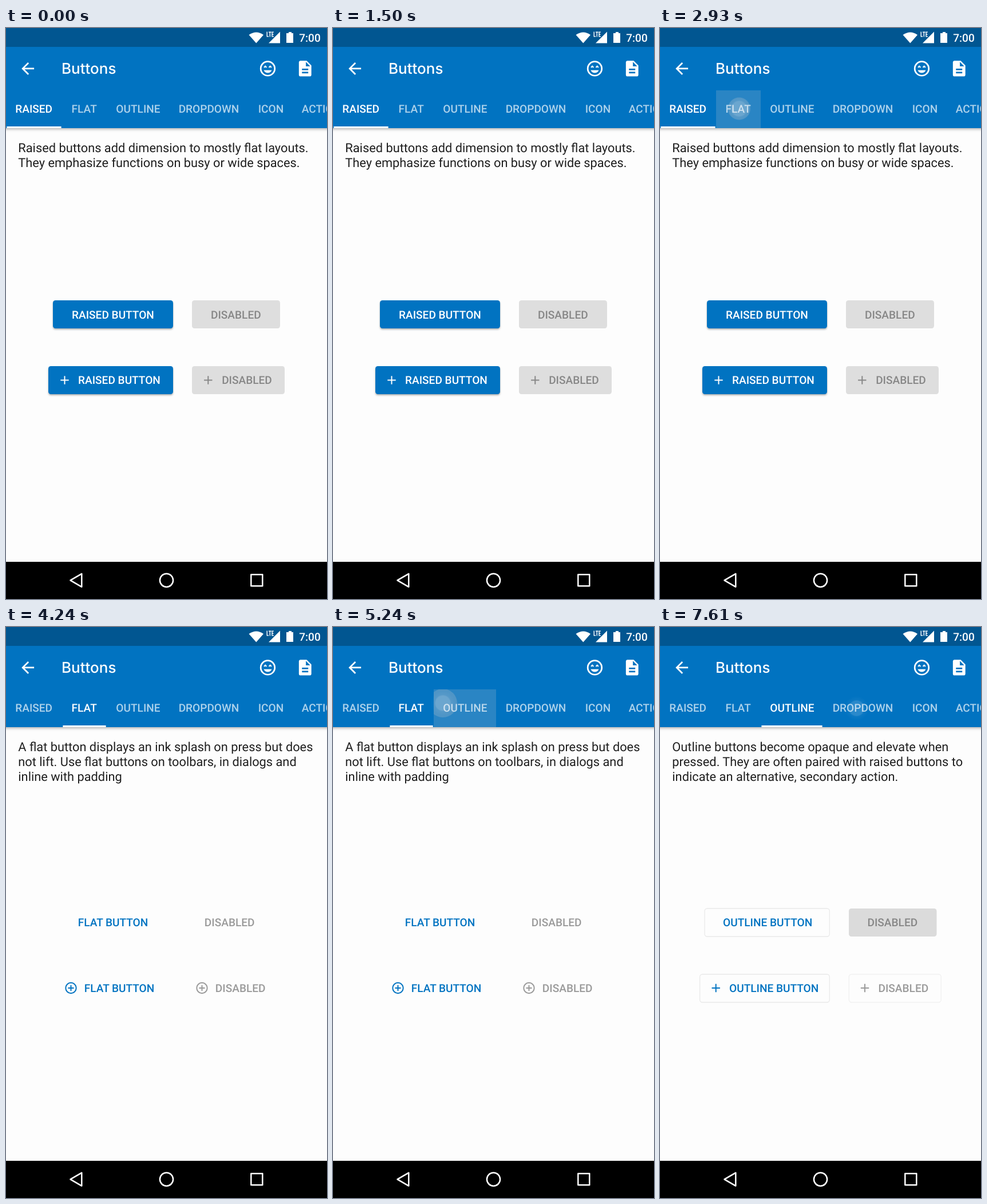
Write an HTML page that moves like this. It is 561 px wide and 998 px high and loops after 8 s.

```html
<!DOCTYPE html>
<html lang="en">
<head>
<meta charset="utf-8">
<title>Buttons demo</title>
<style>
  html, body { margin: 0; width: 100%; height: 100%; overflow: hidden; background: #fdfdfd; }
  svg { display: block; width: 100%; height: 100%; text-rendering: geometricPrecision; }
  text { font-family: Roboto, sans-serif; }
  .label { font-size: 19.09px; font-weight: 500; text-anchor: middle; }
  .body { font-size: 21.8px; fill: #1f1f1f; }
  .title { font: 500 26px Inter, sans-serif; }
  .bar { filter: drop-shadow(0 2px 2.5px rgba(0, 0, 0, .3)); }
  .raised { filter: drop-shadow(0 2px 1.5px rgba(0, 0, 0, .3)); }
</style>
</head>
<body>
<svg viewBox="0 0 561 998" preserveAspectRatio="none">
  <defs>
    <radialGradient id="glow">
      <stop offset=".58" stop-color="#fff" stop-opacity=".16"/>
      <stop offset=".68" stop-color="#fff" stop-opacity=".04"/>
      <stop offset="1" stop-color="#fff" stop-opacity="0"/>
    </radialGradient>
    <clipPath id="tabClip"><rect id="clipBox" y="109" height="66"/></clipPath>
  </defs>
  <rect width="561" height="998" fill="#fdfdfd"/>
  <g id="pages"></g>

  <rect class="bar" x="-10" y="-10" width="581" height="185" fill="#0173c1"/>
  <rect width="561" height="33" fill="#015691"/>
  <g fill="#fff">
    <path d="M424.5 12Q437.500 3 450 12L437.300 26.500Z"/>
    <path d="M459 26.500H479V6.500Z"/>
    <path d="M456.200 6.500V14.800H459M459 7.200H463.600M461.300 7V15.500M467.800 7.200H465V14.800H467.800M465 11H467.500" fill="none" stroke="#fff" stroke-width="1.4"/>
    <path d="M490 9H494V7H499V9H502V26H490Z"/>
    <text class="label" x="531" y="23.500">7:00</text>
    <path transform="translate(21.8 54.6) scale(1.364)" d="M20 11H7.830l5.590-5.590L12 4l-8 8 8 8 1.410-1.410L7.830 13H20z"/>
    <text class="title" x="97" y="80">Buttons</text>
    <g transform="translate(441.1 54.6) scale(1.364)">
      <circle cx="12" cy="12" r="9" fill="none" stroke="#fff" stroke-width="2"/>
      <path d="M7.300 10.500l1.580-1.600 1.580 1.600M13.540 10.500l1.580-1.600 1.580 1.600" fill="none" stroke="#fff" stroke-width="1.5"/>
      <path d="M12 17.500c2.330 0 4.310-1.460 5.110-3.500H6.890c.8 2.040 2.780 3.500 5.110 3.500z"/>
    </g>
    <path transform="translate(506.4 54.6) scale(1.364)" d="M14 2H6c-1.100 0-2 .9-2 2V20c0 1.100.9 2 2 2H18c1.100 0 2-.9 2-2V8zm2 16H8v-2h8zm0-4H8v-2h8zm-3-5V3.500L18.500 9z"/>
  </g>

  <g id="ink" clip-path="url(#tabClip)" fill="#ccc">
    <rect id="light" y="109" height="66"/>
    <circle id="splash" fill-opacity=".23"/>
  </g>
  <g id="tabs" fill="#fff"></g>
  <rect id="line" y="172" height="3" fill="#fff"/>
  <circle id="spot" r="21.5" fill="url(#glow)"/>

  <rect y="933" width="561" height="65" fill="#000"/>
  <g fill="none" stroke="#fff" stroke-width="2.5" stroke-linejoin="round">
    <path d="M112.500 965.300L132.300 953.800V976.800Z"/>
    <circle cx="280.500" cy="965.300" r="11.600"/>
    <rect x="428.300" y="955.300" width="20" height="20"/>
  </g>
</svg>
<script>
const LOOP = 8000, BLUE = '#0173c1', GREY = '#9a9a9a', DIM = '#878787';
const $ = id => document.getElementById(id);
const set = (el, attrs) => { for (const k in attrs) el.setAttribute(k, attrs[k]); };

const label = (s, x, y, fill) => `<text class="label" x="${x}" y="${y + 6.8}" fill="${fill}">${s}</text>`;
const box = (x1, x2, y, attrs) =>
  `<rect x="${x1}" y="${y}" width="${x2 - x1}" height="49" rx="4.5" ${attrs}/>`;
const plus = (x, y, color, r = 7.2) =>
  `<path d="M${x - r} ${y}h${2 * r}M${x} ${y - r}v${2 * r}" stroke="${color}" stroke-width="2"/>`;
const ringPlus = (x, y, color) => plus(x, y, color, 5.1) +
  `<circle cx="${x}" cy="${y}" r="9.2" fill="none" stroke="${color}" stroke-width="2"/>`;
const body = lines => lines.map((s, i) => `<text class="body" x="21.3" y="${217 + 26 * i}">${s}</text>`).join('');

const solid = `class="raised" fill="${BLUE}"`;
const off = 'fill="#dedede"';
const edge = a => `fill="none" stroke="#000" stroke-opacity="${a}" stroke-width="1.36"`;

const pages = [
  body(['Raised buttons add dimension to mostly flat layouts.',
        'They emphasize functions on busy or wide spaces.']) +
  box(82, 292, 476, solid) + label('RAISED BUTTON', 187, 500.7, '#fff') +
  box(325, 479, 476, off) + label('DISABLED', 401.8, 500.7, DIM) +
  box(74, 292, 591, solid) + plus(102.5, 615.5, '#fff') + label('RAISED BUTTON', 198, 615.5, '#fff') +
  box(325, 487, 591, off) + plus(353.3, 615.5, DIM) + label('DISABLED', 421, 615.5, DIM),

  body(['A flat button displays an ink splash on press but does',
        'not lift. Use flat buttons on toolbars, in dialogs and',
        'inline with padding']) +
  label('FLAT BUTTON', 187, 516.5, BLUE) + label('DISABLED', 390.7, 516.5, GREY) +
  ringPlus(113.5, 631, BLUE) + label('FLAT BUTTON', 198, 631, BLUE) +
  ringPlus(342.5, 631, GREY) + label('DISABLED', 409.7, 631, GREY),

  body(['Outline buttons become opaque and elevate when',
        'pressed. They are often paired with raised buttons to',
        'indicate an alternative, secondary action.']) +
  box(78, 296.3, 492, edge(.08)) + label('OUTLINE BUTTON', 188.2, 516.5, BLUE) +
  box(330, 483.5, 492, 'fill="#dbdbdb"') + label('DISABLED', 406.3, 516.5, DIM) +
  box(69.6, 296.3, 607, edge(.08)) + plus(97.7, 631, BLUE) + label('OUTLINE BUTTON', 199.2, 631, BLUE) +
  box(330.3, 491.3, 607, edge(.05)) + plus(358, 631, GREY) + label('DISABLED', 425.3, 631, GREY)
];
$('pages').innerHTML = pages.map(p => `<g>${p}</g>`).join('');

const tabs = [['RAISED', 48.7], ['FLAT', 136.7], ['OUTLINE', 231], ['DROPDOWN', 354.5], ['ICON', 463], ['ACTION', 551]];
$('tabs').innerHTML = tabs.map(([s, x]) => label(s, x, 141, '#fff')).join('');
const edges = [0, 98, 176, 285];

// One press per page: touch shown at `from`, then 7 steps of `step` ms starting at `start`.
const presses = [
  { from: 2380, start: 2380, step: 91.6, base: 0, x: 138.3, y: 141, r: 19.5 },
  { from: 4450, start: 4700, step: 90, base: .4, x: 192, y: 133, r: 25 },
  { from: 6860, start: 6860, step: 125, base: 0, x: 343.5, y: 142, r: 0 }
];

function draw(t) {
  const page = t < 4240 ? 0 : t < 6610 ? 1 : 2;
  [...$('pages').children].forEach((g, i) => set(g, { display: i === page ? 'inline' : 'none' }));
  [...$('tabs').children].forEach((el, i) => set(el, { 'fill-opacity': i === page ? 1 : .68 }));
  set($('line'), { x: edges[page] + 1.4, width: edges[page + 1] - edges[page] - 2.8 });

  const { from, start, step, base, x, y, r } = presses[page];
  const p = t < start ? 0 : Math.min(7, Math.floor((t - start) / step) + 1) / 7;
  set($('spot'), { cx: x, cy: y, opacity: t < from ? 0 : base + (1 - base) * p });

  set($('ink'), { opacity: r && p ? 1 : 0 });
  if (!r) return;
  const tab = { x: edges[page + 1], width: edges[page + 2] - edges[page + 1] };
  set($('clipBox'), tab);
  set($('light'), { ...tab, 'fill-opacity': .2 * Math.min(1, 2 * p) });
  set($('splash'), { cx: x, cy: y, r: r * p });
}

const t0 = performance.now();
function tick() {
  draw((performance.now() - t0) % LOOP);
  requestAnimationFrame(tick);
}
tick();
</script>
</body>
</html>
```
